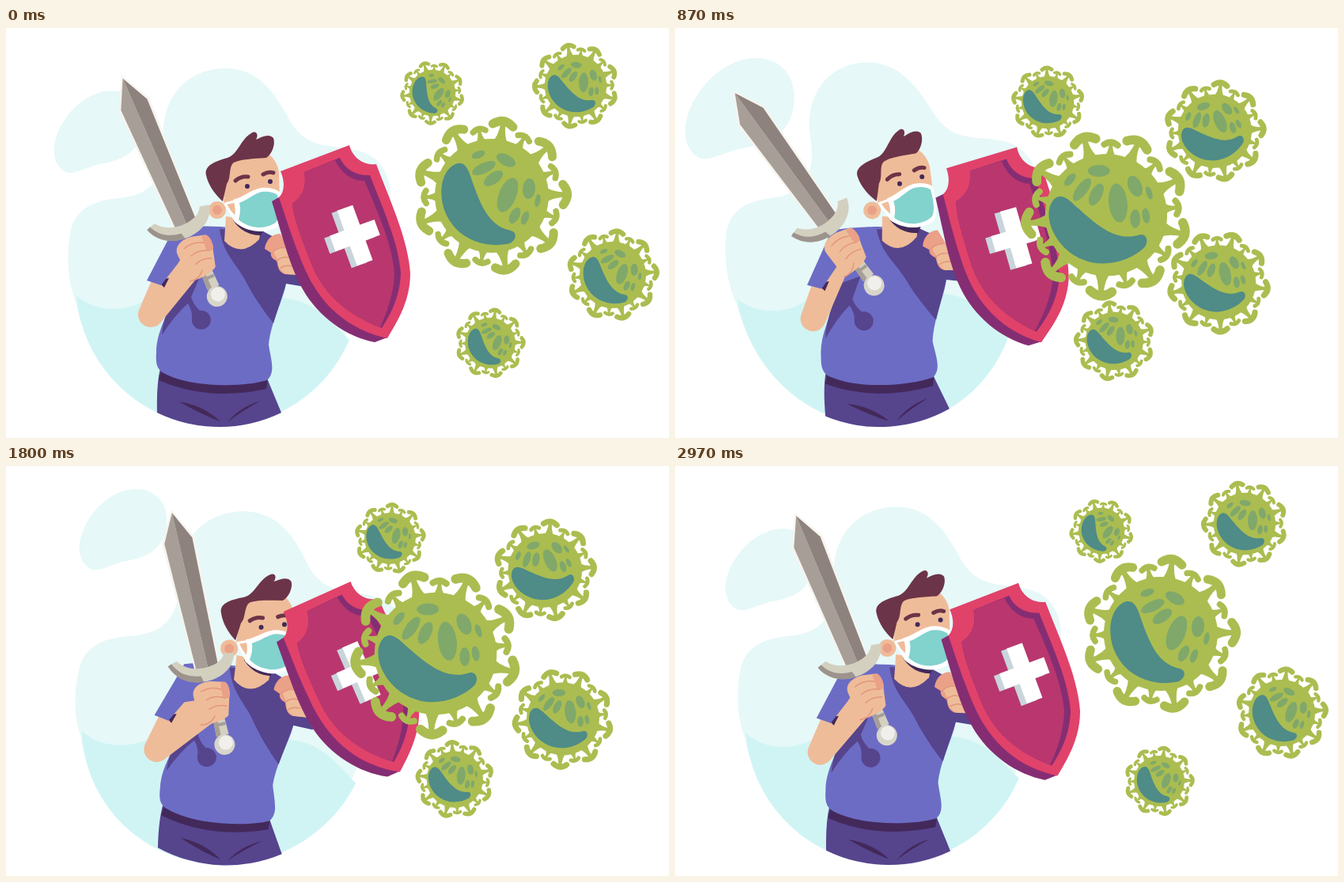
These frames come from a looping animation (838 by 518 pixels, 3.01 s). An HTML page:

```html
<!DOCTYPE html>
<html lang="en">
<head>
<meta charset="utf-8">
<title>Shield against viruses</title>
<style>
  html, body { margin: 0; width: 100%; height: 100%; overflow: hidden; background: #fff; }
  svg { display: block; width: 838px; height: 518px; }
  .pale { fill: #e6f8f8; }
  .water { fill: #d0f4f4; }
  .shirt { fill: #6c6cc5; }
  .violet { fill: #56448d; }
  .dark { fill: #43295a; }
  .skin { fill: #efbc99; }
  .blush { fill: #eba088; }
  .hair { fill: #6c3448; }
  .rim { fill: #e0426a; }
  .face { fill: #b9376e; }
  .edge { fill: #852d73; }
  .line { fill: none; stroke-linecap: round; stroke-linejoin: round; }
  .fold { stroke: #e2967d; stroke-width: 1.5; }
  .green { fill: #abbd50; }
  .cap { stroke: #abbd50; }
  .spot { fill: #80a86b; }
  .teal { fill: #4f8b87; }
</style>
</head>
<body>
<svg viewBox="0 0 838 518">
  <defs>
    <g id="shell">
      <g id="caps"></g>
      <circle class="green" r="72"/>
    </g>
    <g id="core">
      <path class="teal" d="M-43-41C-66-35-72 8-50 36C-32 60 0 66 23 60C32 55 32 46 24 44C-5 38-15 10-28-28C-32-38-36-42-43-41Z"/>
      <g id="spots" class="spot"></g>
    </g>
  </defs>

  <g id="scene">
    <path class="pale" d="M88 345C76 315 77 280 82 255C90 225 115 217 150 214C190 208 203 180 199 140C196 85 232 51 277 51C325 51 345 92 362 122C385 155 410 146 445 155C475 162 490 190 485 225C478 270 445 290 445 322A180 180 0 0 1 88 345Z"/>
    <path class="water" d="M89 338C115 362 160 360 190 335L350 341C385 345 400 360 434 394A180 180 0 0 1 89 338Z"/>
  </g>
  <path id="drop" class="pale" d="M-55 20C-53-8-26-44 7-50C38-55 56-36 55-8C53 22 34 34 8 39C-10 42-24 50-35 51C-48 50-56 36-55 20Z"/>

  <g id="body">
    <path class="violet" d="M195 430Q190 450 191 486A180 180 0 0 0 348 486Q338 462 331 445Z"/>
    <path class="dark" d="M197 431Q245 458 331 444L329 456Q255 472 193 445Z"/>
    <path class="dark" d="M219 472Q250 477 271 497Q246 488 219 472ZM322 471Q295 479 280 498Q296 485 322 471Z"/>
    <path class="violet" d="M325 258L346 270L380 327L352 322Z"/>
    <path class="shirt" d="M272 251C250 250 222 250 212 253L190 310L212 340C203 365 190 385 190 410C189 425 191 431 199 436C235 455 300 454 330 445C341 435 335 420 332 400C335 370 352 340 354 322L345 270L325 257Z"/>
    <path class="violet" d="M270 254C274 285 290 296 302 318C312 338 326 358 338 373L354 323L378 327L350 270L325 257Z"/>
    <path class="violet" d="M246 312L234 340Q237 350 245 357A12 12 0 1 1 235 367Q236 358 230 348Q213 363 197 388Q198 370 209 345L212 322Z"/>
    <path class="skin" d="M278 238L276 269Q297 291 320 267L324 245Z"/>
    <path class="dark" d="M287 243Q305 252 326 254L322 262Q300 262 287 243Z"/>

    <g id="head">
      <path class="skin" d="M279 172L290 162L332 159Q343 168 345 182L346 218L304 250L275 222Z"/>
      <path class="hair" d="M274 219C266 212 256 200 253 186C250 175 262 169 280 164C293 160 297 140 310 133C316 129 320 134 316 141C324 137 333 133 338 139C341 147 336 160 329 164C312 165 296 166 288 170C281 175 285 190 279 197Q277 206 274 219Z"/>
      <circle class="skin" cx="267" cy="230" r="11"/>
      <circle class="blush" cx="267" cy="230" r="6"/>
      <path class="line" stroke="#fff" stroke-width="3" d="M289 219L277 222L290 243"/>
      <path fill="#fff" d="M287 217C300 214 308 205 322 202C332 201 340 203 346 207C350 230 348 248 342 252C325 262 300 256 288 244C290 235 291 228 287 217Z"/>
      <path fill="#82d2ce" d="M295 221C306 217 314 209 323 207C333 206 339 208 343 211C347 230 345 245 339 247C324 256 305 252 294 242C296 235 297 228 295 221Z"/>
      <circle class="dark" cx="305" cy="200" r="3"/>
      <circle class="dark" cx="334" cy="194" r="3"/>
      <path class="line" stroke="#6c3448" stroke-width="5" d="M290 193Q297 187 306 188M325 185Q332 181 338 183"/>
    </g>

    <path class="blush" d="M327 279C328 268 337 259 347 260L368 300L371 312L352 311C343 307 344 300 342 294C336 292 334 287 335 284Z"/>
    <path class="skin" d="M338 282Q350 274 358 280L372 312L354 311Q343 305 344 295Z"/>
    <path class="line fold" d="M336 284Q345 276 352 278M342 294Q350 288 357 290M347 303Q354 299 361 301"/>
  </g>

  <path id="arm" class="skin" stroke="#efbc99" stroke-width="32" stroke-linejoin="round"/>
  <g id="sleeve">
    <path class="dark" d="M190 318L200 328L206 316Z"/>
    <path class="shirt" d="M213 252L178 319L196 325L217 298L240 262Z"/>
  </g>

  <g id="sword">
    <path d="M0-240L-19-204L-14-34H14L19-204Z" fill="#f6f4ee" stroke="#f6f4ee" stroke-width="4"/>
    <path d="M0-240L-18-204L-14-34H1Z" fill="#a69e97"/>
    <path d="M0-240L18-204L14-34H1Z" fill="#8d827d"/>
    <path d="M-48-52L-36-56C-28-44-14-40-2-40C12-41 20-44 25-53L37-50C33-33 16-22-6-23C-26-24-42-34-48-52Z" fill="#d3d0c0"/>
    <path d="M-48-52L-43-54C-36-38-24-33-10-31L-8-23C-26-24-42-34-48-52Z" fill="#9c948c"/>
    <path d="M-7 15H7L8 48H-8Z" fill="#d3d0c0"/>
    <path d="M-7 15H-2V48H-8ZM-7 32H7V36H-7Z" fill="#a69e97"/>
    <circle cy="60" r="13" fill="#d8d5ca"/>
    <circle cx="2" cy="58" r="9" fill="#f0efeb"/>
    <path class="skin" d="M-25-8C-25-19-14-24 0-22L18-17C22-12 22-2 19 3C17 10 15 18 13 25C6 30-8 31-24 30Z"/>
    <path class="blush" d="M12-17Q20-19 21-10Q22 0 18 4L11 2Z"/>
    <path class="line fold" d="M-14-12Q0-16 11-9M-10 0Q2-4 14 3M-9 12Q2 8 13 13M-24 29Q-12 32-4 22"/>
  </g>

  <g id="shield">
    <path class="edge" d="M336 219L350 211L482 391L466 397C430 390 395 365 375 330C358 300 350 265 336 219Z"/>
    <path class="rim" d="M347 181L434 148C438 164 452 174 468 172C484 215 508 265 511 310C511 345 495 370 482 392C432 381 398 350 378 305C362 268 354 240 345 214C352 207 353 195 347 181Z"/>
    <path class="edge" d="M377 182L422 164C428 178 442 187 460 186C475 225 496 270 499 310C498 340 486 362 475 379C430 362 400 335 385 295C372 262 364 240 362 222C376 212 380 200 377 182Z"/>
    <path class="face" d="M377 182L416 167C424 183 436 193 453 193C468 228 488 272 491 310C490 338 481 360 473 378C430 362 400 335 385 295C372 262 364 240 362 222C376 212 380 200 377 182Z"/>
    <g fill="none" stroke-width="21">
      <path stroke="#c9d5db" d="M0-37V37M-30 0H30" transform="translate(434 265) rotate(-20)"/>
      <path stroke="#fff" d="M0-37V37M-30 0H30" transform="translate(441 262) rotate(-20)"/>
    </g>
  </g>
  <g id="swarm"></g>
</svg>

<script>
const LOOP = 3010;
const KEYS = [0, 630, 1070, 1470, 2170, 2530];
const $ = id => document.getElementById(id);
const mix = (a, b, k) => a + (b - a) * k;

// Periodic cubic through values at KEYS, with parabolic tangents
function track(...v) {
  const n = KEYS.length, at = i => (i + n) % n;
  const len = i => (KEYS[at(i + 1)] - KEYS[at(i)] + LOOP) % LOOP;
  const slope = i => (v[at(i + 1)] - v[at(i)]) / len(i);
  const tangent = i => {
    const a = len(i - 1), b = len(i);
    return (slope(i - 1) * b + slope(i) * a) / (a + b);
  };
  return t => {
    let i = n - 1;
    while (KEYS[i] > t) i--;
    const h = len(i), x = (t - KEYS[i]) / h, y = 1 - x;
    return v[i] * (1 + 2 * x) * y * y + tangent(i) * h * x * y * y
      + v[at(i + 1)] * x * x * (3 - 2 * x) - tangent(i + 1) * h * x * x * y;
  };
}

const lean = track(0, -12.9, -10.2, -0.8, 18.6, 12.3);
const late = track(0, 0.56, 0.93, 1, 0.49, 0.265);
const early = track(0, 0.6, 1, 0.875, 0.43, 0.24);
const dropX = track(117, 81, 89, 122, 163, 149);
const dropY = track(131, 116, 89, 69, 104, 119);
const dropSize = track(1.02, 1.26, 1.22, 1.11, 0.93, 0.97);

const big = `<path class="green" d="M-10-68Q-4-75-3-92H3Q4-75 10-68Z"/>
  <path class="cap line" stroke-width="11" d="M-13-90Q0-101 13-90"/>`;
const small = `<path class="green" d="M-7-69Q-2.5-74-2-84H2Q2.5-74 7-69Z"/>
  <path class="cap line" stroke-width="7.5" d="M-8-83Q0-89 8-83"/>`;
for (let i = 0; i < 18; i++)
  $('caps').innerHTML += `<g transform="rotate(${i * 20 + 9})">${i % 2 ? small : big}</g>`;

// x, y, rx, ry, angle
const spots = [
  [-17, -52, 9, 4.5, -20], [18, -45, 13, 7, 28], [-10, -35, 16, 6.5, -25],
  [2, -22, 14, 7, -35], [20, -1, 23, 11, -68], [47, -9, 8, 13, 5],
  [29, 25, 11, 6, -62], [42, 28, 9, 4.5, -70], [58, 6, 3.5, 8, 10]
];
for (const [x, y, rx, ry, a] of spots)
  $('spots').innerHTML += `<ellipse rx="${rx}" ry="${ry}" transform="translate(${x} ${y}) rotate(${a})"/>`;

// progress, then start and end of: x, y, scale, angle
const viruses = [
  [early, [539, 460], [82, 96], [0.405, 0.47], [15, -15]],
  [late, [720, 672], [73, 146], [0.545, 0.675], [-20, -48]],
  [early, [767, 674], [312, 323], [0.584, 0.665], [-3, -36]],
  [early, [612, 546], [398, 395], [0.443, 0.52], [0, -20]],
  [late, [614, 526], [212, 243], [1, 1.09], [0, -32]]
];
$('swarm').innerHTML = '<g><use href="#shell"/><use href="#core"/></g>'.repeat(viruses.length);
const swarm = [...$('swarm').children];

const move = (id, value) => $(id).setAttribute('transform', value);

function swing(x, y, deg) {
  const a = deg * Math.PI / 180, dx = x - 265, dy = y - 502;
  return `${265 + dx * Math.cos(a) - dy * Math.sin(a)} ${502 + dx * Math.sin(a) + dy * Math.cos(a)}`;
}

function draw(now) {
  const t = now % LOOP, u = lean(t), tilt = 0.28 * u;
  const handX = 243 + 2 * u - 0.01 * u * u;
  const handY = 284 + 0.75 * u + 0.013 * u * u;
  const shear = 0.00005 * u * u - 0.0058 * u;

  move('scene', `translate(265 502) matrix(${1 + 0.0012 * u} ${0.003 * u} ${shear} ${1 - 0.00124 * u} 0 0) translate(-265 -502)`);
  move('drop', `translate(${dropX(t)} ${dropY(t)}) scale(${dropSize(t)})`);
  for (const id of ['body', 'sleeve']) move(id, `rotate(${tilt} 265 502)`);
  move('head', `translate(${0.1 * u} 0) rotate(${0.18 * u} 267 230)`);
  $('arm').setAttribute('d', `M${swing(201, 320, tilt)}L${swing(183, 362, tilt)}L${handX - 10} ${handY + 17}Z`);
  move('sword', `translate(${handX} ${handY}) rotate(${u - 23.4})`);
  move('shield', `translate(${0.15 * u} ${-0.2 * u}) rotate(${-0.32 * u} 434 148)`);

  viruses.forEach(([progress, ...ends], i) => {
    const k = progress(t);
    const [x, y, s, a] = ends.map(([from, to]) => mix(from, to, k));
    const [shell, core] = swarm[i].children;
    swarm[i].setAttribute('transform', `translate(${x} ${y}) scale(${s})`);
    shell.setAttribute('transform', `rotate(${a})`);
    core.setAttribute('transform', `translate(${-4 * k} ${-5 * k}) rotate(${a - 4 * k})`);
  });
}

const start = performance.now();
function tick() {
  draw(performance.now() - start);
  requestAnimationFrame(tick);
}
tick();
</script>
</body>
</html>
```
